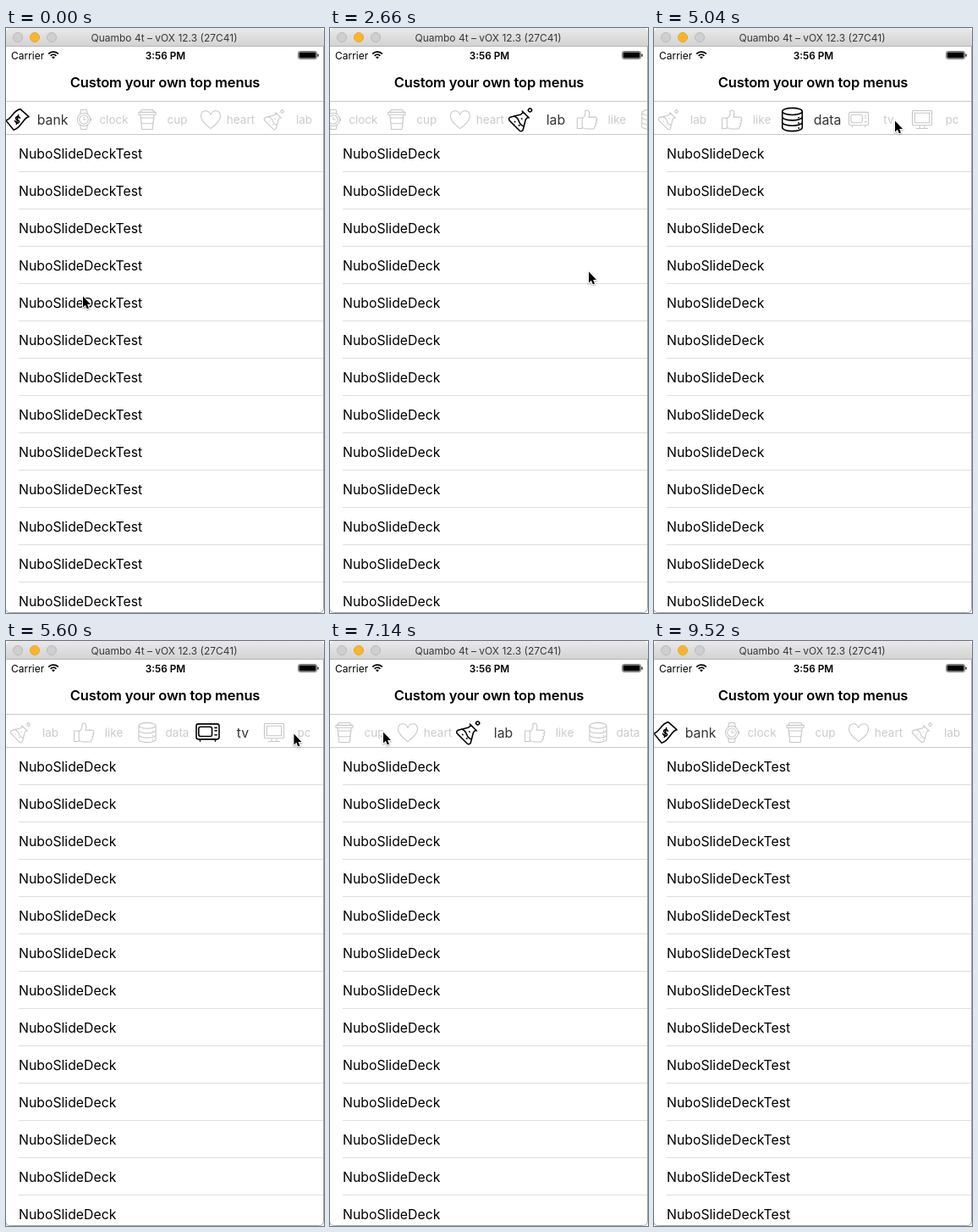
An HTML page with a canvas for the animation above (9.62 s loop, 376 by 690 pixels).

```html
<!DOCTYPE html>
<html lang="en">
<head>
<meta charset="utf-8">
<title>Top menu pager</title>
<style>
html, body { margin: 0; width: 100%; height: 100%; overflow: hidden; background: #fff; }
canvas { display: block; }
</style>
</head>
<body>
<canvas id="stage" width="376" height="690"></canvas>
<script>
const c = document.getElementById('stage').getContext('2d');
const LOOP = 9620, STEP = 140, PAGE = 375, TAB = 75, LAG = 110;

// name, outline centred on 0,0, rotation in degrees
const tabs = [
  ['bank', 'M-12 1C-6-1-4-10 3-11L12-3C6-2 4 9-4 11ZM2.6-1.6C1.5-4.2-2.6-3-1.5-.8S2.6.8 1.6 2.8-2.6 3-2.6 1.2M1-4.8L-1 4.8', 0],
  ['clock', 'M8 0A8 8 0 1 1-8 0A8 8 0 1 1 8 0M5.5 0A5.5 5.5 0 1 1-5.5 0A5.5 5.5 0 1 1 5.5 0M-4.5-7L-3.5-12H3.5L4.5-7M-4.5 7L-3.5 12H3.5L4.5 7M0-3V0H2.5M8-1H9V1H8', 0],
  ['cup', 'M-7-12H7L8.5-9H-8.5ZM-10.5-9H10.5V-6H-10.5ZM-8.5-6L-6.5 12H6.5L8.5-6M-8-2H8L7 5H-7Z', 0],
  ['heart', 'M0 11C-8 5-12 1-12-4C-12-12-3-13 0-6C3-13 12-12 12-4C12 1 8 5 0 11Z', 0],
  ['lab', 'M-5-7.5H5M-3.6-7.5V-4L-9.5 6Q-10 9-7 9H7Q10 9 9.5 6L3.6-4V-7.5M-7.5 2.5Q-4 .5 0 2.5T7.5 2.5M-3 5.8H-2.5M3 5.5H3.5M0-1.5H.5M1.8-14A1.8 1.8 0 1 1-1.8-14A1.8 1.8 0 1 1 1.8-14', 45],
  ['like', 'M-12-2H-6V11H-12ZM-6-1C-2-4-2-6-2-11C3-13 4-8 2-3H9.5C13-3 13 1 10.8 1C13 2 12 5 10 5C12 6 11 8.5 9 8.5C10 10 9 11.5 7 11.5H0Q-4 11-6 9.5', 0],
  ['data', 'M-10.5-8.5A10.5 3.6 0 1 1 10.5-8.5A10.5 3.6 0 1 1-10.5-8.5V8.5A10.5 3.6 0 0 0 10.5 8.5V-8.5M-10.5-2.8A10.5 3.6 0 0 0 10.5-2.8M-10.5 2.8A10.5 3.6 0 0 0 10.5 2.8M6.5-2H7M6.5 3.7H7M6.5 9H7', 0],
  ['tv', 'M-10-9H10Q12-9 12-7V5Q12 7 10 7H-10Q-12 7-12 5V-7Q-12-9-10-9ZM-7.5-6H2.5Q4.5-6 4.5-4V2Q4.5 4 2.5 4H-7.5Q-9.5 4-9.5 2V-4Q-9.5-6-7.5-6M7.5-5H9.5M7.5-2H9.5M7.5 2.5H9.5M-8 7V9M8 7V9', 0],
  ['pc', 'M-11-11H11Q12-11 12-10V6Q12 7 11 7H-11Q-12 7-12 6V-10Q-12-11-11-11ZM-9-8H9V4H-9ZM-3 7V10.5M3 7V10.5M-7 11H7', 0]
].map(([name, d, turn]) => ({ name, shape: new Path2D(d), turn: turn * Math.PI / 180 }));

// start, duration, page, swiped (otherwise tapped)
const moves = [
  [180, 380, 1, true], [740, 400, 2, true], [1500, 400, 3, true],
  [2180, 400, 4, true], [2980, 400, 5, true], [3780, 400, 6, true],
  [5180, 300, 7, false], [5740, 300, 8, false], [6720, 300, 4, false],
  [7535, 300, 2, false], [8120, 300, 0, false]
];

// time, x, y of the pointer tip
const pointer = [
  [0, 91, 315], [160, 300, 300], [380, 110, 305], [720, 300, 298], [960, 120, 305],
  [1260, 233, 302], [1480, 300, 292], [1700, 110, 300], [2160, 305, 290],
  [2370, 115, 298], [2640, 306, 286], [2960, 306, 288], [3180, 110, 296],
  [3760, 305, 290], [3980, 110, 300], [4700, 240, 150], [5040, 285, 108],
  [5320, 290, 108], [5660, 345, 108], [5880, 345, 108], [6300, 81, 106],
  [6580, 63, 106], [8300, 63, 106], [8900, 290, 143], [9100, 290, 143]
];
const arrow = new Path2D('M0 0V13L2.9 10.3L4.8 14.8L7 13.9L5.1 9.4H9Z');

const clamp = (v, lo, hi) => Math.min(hi, Math.max(lo, v));
const mix = (a, b, u) => a + (b - a) * u;
const smooth = u => u * u * (3 - 2 * u);
const glide = u => smooth(1 - (1 - u) ** 2);

function pageAt(t) {
  return moves.reduce((p, [start, span, page, swiped]) => {
    const u = clamp((t - start) / span, 0, 1);
    return mix(p, page, swiped ? glide(u) : smooth(u));
  }, 0);
}

// The tab row follows a swipe once it lands, a tap at once.
function menuAt(t) {
  return moves.reduce((x, [start, span, page, swiped]) => {
    const u = clamp((t - start - (swiped ? span : 0)) / 300, 0, 1);
    return mix(x, clamp((page - 2) * TAB, 0, 300), smooth(u));
  }, 0);
}

function text(s, x, y, size, color, weight = 400, align = 'left', spacing = 0) {
  c.font = `${weight} ${size}px Inter, Roboto, sans-serif`;
  c.letterSpacing = spacing + 'px';
  c.textAlign = align;
  c.fillStyle = color;
  c.fillText(s, x, y);
}

function box(x, y, w, h, color) {
  c.fillStyle = color;
  c.fillRect(x, y, w, h);
}

function clipped(x, y, w, h, draw) {
  c.save();
  c.beginPath();
  c.rect(x, y, w, h);
  c.clip();
  draw();
  c.restore();
}

function round(x, y, w, h, r, fill, line) {
  c.beginPath();
  c.roundRect(x, y, w, h, r);
  if (fill) { c.fillStyle = fill; c.fill(); }
  if (line) { c.strokeStyle = line; c.lineWidth = 1; c.stroke(); }
}

function titleBar() {
  const shade = c.createLinearGradient(0, 0, 0, 22);
  shade.addColorStop(0, '#e9e9e9');
  shade.addColorStop(1, '#d2d2d2');
  round(0, 0, 376, 22, [5, 5, 0, 0], shade);
  box(0, 21, 376, 1, '#b5b5b5');
  [['#cfcfcf', '#b9b9b9'], ['#fbb42d', '#e6a826'], ['#cfcfcf', '#b9b9b9']].forEach(
    ([fill, line], i) => round(8.5 + 20 * i, 5.5, 11, 11, 5.5, fill, line));
  text('Quambo 4t – vOX 12.3 (27C41)', 187, 16, 12, '#383838', 400, 'center');
}

function statusBar() {
  text('Carrier', 6, 37, 12, '#000');
  c.strokeStyle = '#000';
  c.lineWidth = 1.7;
  for (const r of [4.6, 7.9]) {
    c.beginPath();
    c.arc(56, 36, r, -Math.PI * .76, -Math.PI * .24);
    c.stroke();
  }
  c.beginPath();
  c.moveTo(56, 36.5);
  c.arc(56, 36, 2.4, -Math.PI * .78, -Math.PI * .22);
  c.fillStyle = '#000';
  c.fill();
  text('3:56 PM', 188.5, 37, 11.8, '#000', 600, 'center');
  round(345.5, 27.5, 22, 9, 2, null, '#777');
  round(346.5, 28.5, 20, 7, 1, '#000');
  round(368.3, 30.5, 1.4, 3.5, .7, '#333');
}

function tab(i, x, grow, active) {
  const { name, shape, turn } = tabs[i];
  c.save();
  c.translate(x + TAB / 2, 108);
  c.scale(1 + .17 * grow, 1 + .17 * grow);
  text(name, 15, 5, 13.5, active ? '#333' : '#cbcbcb', 400, 'center');
  c.translate(-20.5, 0);
  c.rotate(turn);
  c.scale(.96, .96);
  c.strokeStyle = active ? '#000' : '#c6c6c6';
  c.lineWidth = active ? 1.4 : 1.1;
  c.lineJoin = c.lineCap = 'round';
  c.stroke(shape);
  c.restore();
}

function list(page, x) {
  const label = page ? 'NuboSlideDeck' : 'NuboSlideDeckTest';
  for (let y = 126; y < 688; y += 44) {
    text(label, x + 15, y + 28, 15.8, '#000');
    box(x + 15, y + 43, 360, 1, '#dedee0');
  }
}

function cursor(t) {
  const i = pointer.findIndex(k => k[0] > t);
  if (i < 1) return;
  const [t0, x0, y0] = pointer[i - 1], [t1, x1, y1] = pointer[i];
  const u = smooth((t - t0) / (t1 - t0));
  c.save();
  c.translate(mix(x0, x1, u), mix(y0, y1, u) + 1.5);
  c.lineJoin = 'round';
  c.lineWidth = 2;
  c.strokeStyle = '#fff';
  c.shadowColor = 'rgba(0,0,0,.35)';
  c.shadowBlur = 2;
  c.shadowOffsetY = 1;
  c.stroke(arrow);
  c.shadowColor = 'transparent';
  c.fillStyle = '#000';
  c.fill(arrow);
  c.restore();
}

function draw(t) {
  const page = pageAt(t), focus = pageAt(t - LAG), shift = menuAt(t);
  box(0, 0, 376, 690, '#fff');
  clipped(0, 126, 375, 563, () => {
    const first = Math.floor(page);
    for (const p of [first, first + 1]) list(p, Math.round((p - page) * PAGE));
  });
  titleBar();
  statusBar();
  text('Custom your own top menus', 188, 70, 16.5, '#000', 600, 'center', -.15);
  clipped(0, 87, 375, 38, () => tabs.forEach((_, i) => {
    const grow = Math.max(0, 1 - Math.abs(i - focus));
    tab(i, i * TAB - shift, grow, i === Math.round(page));
  }));
  box(0, 86, 375, 1, '#c9c9c9');
  box(0, 125, 375, 1, '#c9c9c9');
  clipped(0, 22, 376, 668, () => round(-.5, -10, 376, 699.5, 5, null, '#a4a4a4'));
  cursor(t);
}

function tick(now) {
  draw(Math.floor(now % LOOP / STEP) * STEP);
  requestAnimationFrame(tick);
}
requestAnimationFrame(tick);
</script>
</body>
</html>
```
